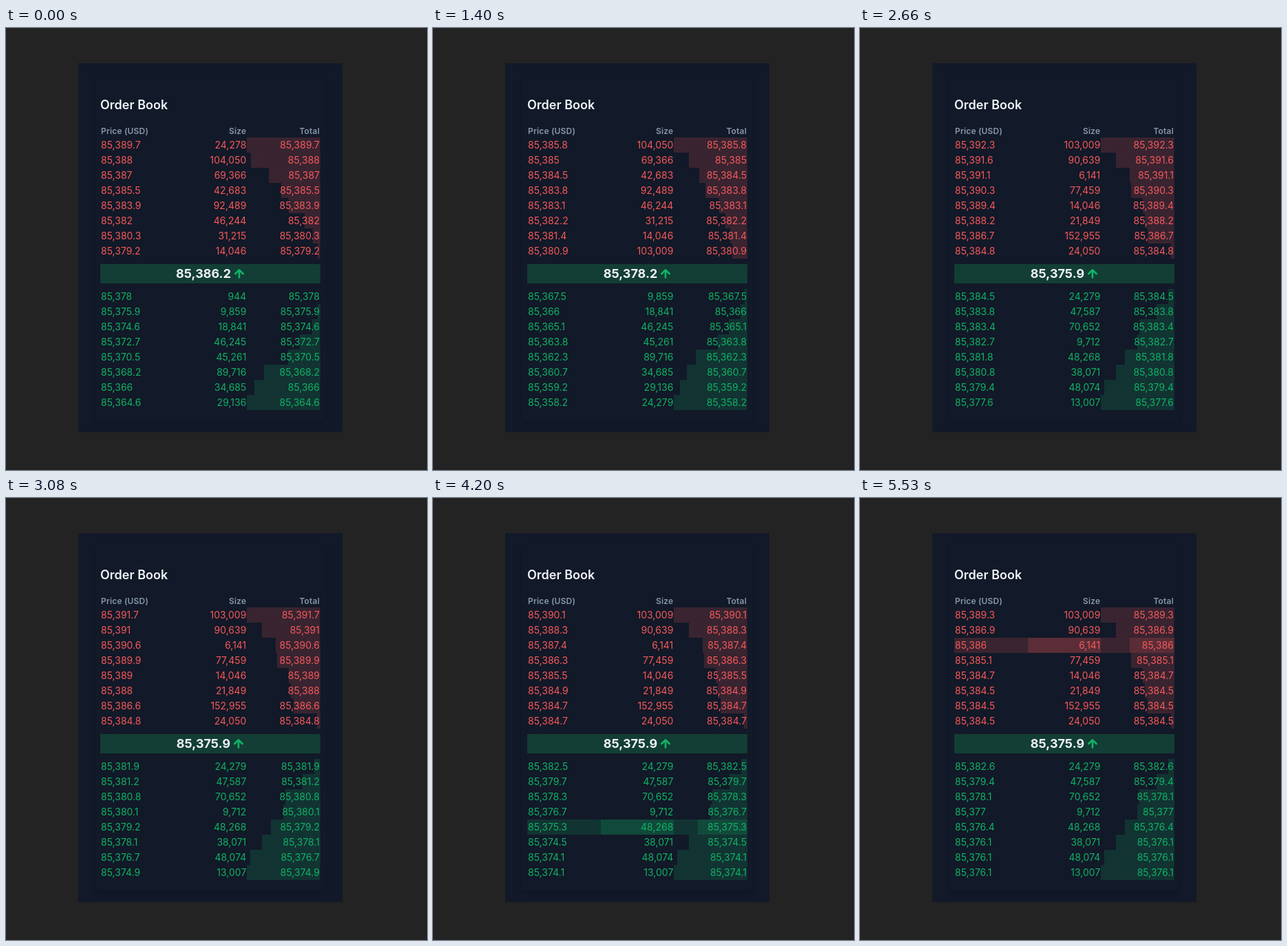
Animation, 612 px wide and 642 px high, one loop 5670 ms. Source, as an HTML page:

```html
<!DOCTYPE html>
<html lang="en">
<head>
<meta charset="utf-8">
<title>Order Book</title>
<style>
  html, body { margin: 0; width: 100%; height: 100%; overflow: hidden; background: #232323; }
  body { position: relative; font: 400 14px/22px Inter, "Liberation Sans", sans-serif; }
  .card { position: absolute; left: 105px; top: 51px; width: 384px; height: 536px; background: #121928; }
  .panel { position: absolute; left: 24px; top: 16px; width: 336px; height: 504px; border-radius: 8px;
           box-shadow: 0 4px 6px -1px rgba(0, 0, 0, .1), 0 2px 4px -2px rgba(0, 0, 0, .1); }
  h1, .head, .side, .mid { position: absolute; left: 32px; width: 320px; margin: 0; }
  h1 { top: 47px; font-size: 18px; line-height: 28px; font-weight: 600; color: #f0f4f8; }
  .head { top: 88px; font-size: 12px; line-height: 21px; font-weight: 600; letter-spacing: .18px; color: #8698aa; }
  .row { display: grid; grid-template-columns: repeat(3, 1fr); white-space: nowrap; }
  .row span { padding: 0 1px; text-align: right; }
  .row span:first-child { text-align: left; }
  .side .row { height: 22px; }
  .side span:last-child { background: linear-gradient(var(--tint), var(--tint)) right / var(--w) 100% no-repeat; }
  .asks { top: 108px; color: #f5595a; --tint: rgba(255, 90, 90, .165); }
  .bids { top: 328px; color: #0fb365; --tint: rgba(16, 186, 104, .165); }
  .lit, .lit span:nth-child(2) { background: var(--tint); }
  .mid { top: 292px; height: 28px; display: flex; align-items: center; justify-content: center; gap: 4px;
         background: #133e35; color: #f0f4f8; font-size: 18px; line-height: 28px; font-weight: 700; }
  .mid svg { width: 16px; height: 16px; fill: none; stroke: #10b568; stroke-width: 2.6;
             stroke-linecap: round; stroke-linejoin: round; }
</style>
</head>
<body>
<div class="card">
  <div class="panel"></div>
  <h1>Order Book</h1>
  <div class="head row"><span>Price (USD)</span><span>Size</span><span>Total</span></div>
  <div class="side asks"></div>
  <div class="mid"><span></span><svg viewBox="0 0 16 16"><path d="M8 13.4V3M2.3 8 8 2.4 13.7 8"/></svg></div>
  <div class="side bids"></div>
</div>
<script>
const LOOP = 5670, TICK = 70, ROWS = 8;

// Update bursts: start time, number of ticks
const bursts = [[0, 2], [490, 5], [910, 9], [1540, 5], [1960, 9], [2590, 8],
  [3500, 9], [4200, 7], [4760, 2], [4970, 1], [5250, 5]];
const times = bursts.flatMap(([start, n]) => Array.from({ length: n }, (_, i) => start + i * TICK));

// Market key points: highest and lowest price of each side, in tenths above 85,000;
// bend crowds the levels to one end, flow slides the resting orders along the levels
const keys = [
  { t: 0,    mid: 3862, asks: [3897, 3792], bids: [3780, 3646], bend: 1,  flow: 0 },
  { t: 1400, mid: 3782, asks: [3858, 3809], bids: [3675, 3582], bend: 1,  flow: 1 },
  { t: 2170, mid: 3741, asks: [4377, 3763], bids: [3682, 3653], bend: 7,  flow: 4 },
  { t: 2660, mid: 3759, asks: [3923, 3848], bids: [3845, 3776], bend: .6, flow: 8 },
  { t: 3640, mid: 3759, asks: [3914, 3848], bids: [3806, 3736], bend: .6, flow: 8 },
  { t: 4760, mid: 3759, asks: [3887, 3845], bids: [3843, 3745], bend: 4,  flow: 7 },
  { t: 5530, mid: 3759, asks: [3893, 3845], bids: [3826, 3761], bend: 4,  flow: 8 }
].map(k => ({ ...k, step: times.indexOf(k.t) }));

const orders = {
  asks: [24278, 104050, 69366, 42683, 92489, 46244, 31215, 14046,
    103009, 90639, 6141, 77459, 14046, 21849, 152955, 24050],
  bids: [944, 9859, 18841, 46245, 45261, 89716, 34685, 29136,
    24279, 47587, 70652, 9712, 48268, 38071, 48074, 13007]
};

const $ = s => document.querySelector(s);
const mix = (a, b, f) => a + (b - a) * f;
const sum = list => list.reduce((x, y) => x + y, 0);
const money = p => (85000 + Math.round(p) / 10).toLocaleString('en-US');
const rand = n => { const x = Math.sin(n * 12.9898 + 4.1) * 43758.5453; return x - Math.floor(x); };

function makeRows(side) {
  return Array.from({ length: ROWS }, () => {
    const row = document.createElement('div');
    row.className = 'row';
    row.innerHTML = '<span></span><span></span><span></span>';
    $('.' + side).append(row);
    return row;
  });
}
const rows = { asks: makeRows('asks'), bids: makeRows('bids') };

function market(step) {
  const k = keys.findLastIndex(key => key.step <= step);
  const a = keys[k], b = keys[k + 1] || a;
  const f = (step - a.step) / (b.step - a.step || 1);
  const range = side => a[side].map((p, i) => mix(p, b[side][i], f));
  return {
    mid: f < .5 ? a.mid : b.mid,
    asks: range('asks'), bids: range('bids'),
    bend: mix(a.bend, b.bend, f),
    flow: Math.round(mix(a.flow, b.flow, f))
  };
}

// Uneven levels between the highest and lowest price
function levelPrice([high, low], i, bend) {
  const last = ROWS - 1;
  const shift = i % last ? (rand(i) - .5) * .7 : 0;
  return mix(low, high, ((last - i + shift) / last) ** bend);
}

function drawSide(side, now, lit) {
  const book = orders[side];
  const sizes = rows[side].map((_, i) => book[(i + now.flow) % book.length]);
  const total = sum(sizes);
  rows[side].forEach((row, i) => {
    const [price, size, end] = row.children;
    const depth = sum(side === 'asks' ? sizes.slice(i) : sizes.slice(0, i + 1));
    price.textContent = end.textContent = money(levelPrice(now[side], i, now.bend));
    size.textContent = sizes[i].toLocaleString('en-US');
    end.style.setProperty('--w', depth / total * 100 + '%');
    row.classList.toggle('lit', i === lit);
  });
}

function draw(step) {
  const now = market(step);
  // Now and then one of the sixteen rows lights up for a tick
  const lit = step % 14 === 5 ? (step * 5 + 1) % (2 * ROWS) : -1;
  drawSide('asks', now, lit);
  drawSide('bids', now, lit - ROWS);
  $('.mid span').textContent = money(now.mid);
}

const start = performance.now();
let shown = -1;
function frame() {
  const t = (performance.now() - start) % LOOP;
  const step = times.findLastIndex(time => time <= t);
  if (step !== shown) draw(shown = step);
  requestAnimationFrame(frame);
}
frame();
</script>
</body>
</html>
```
